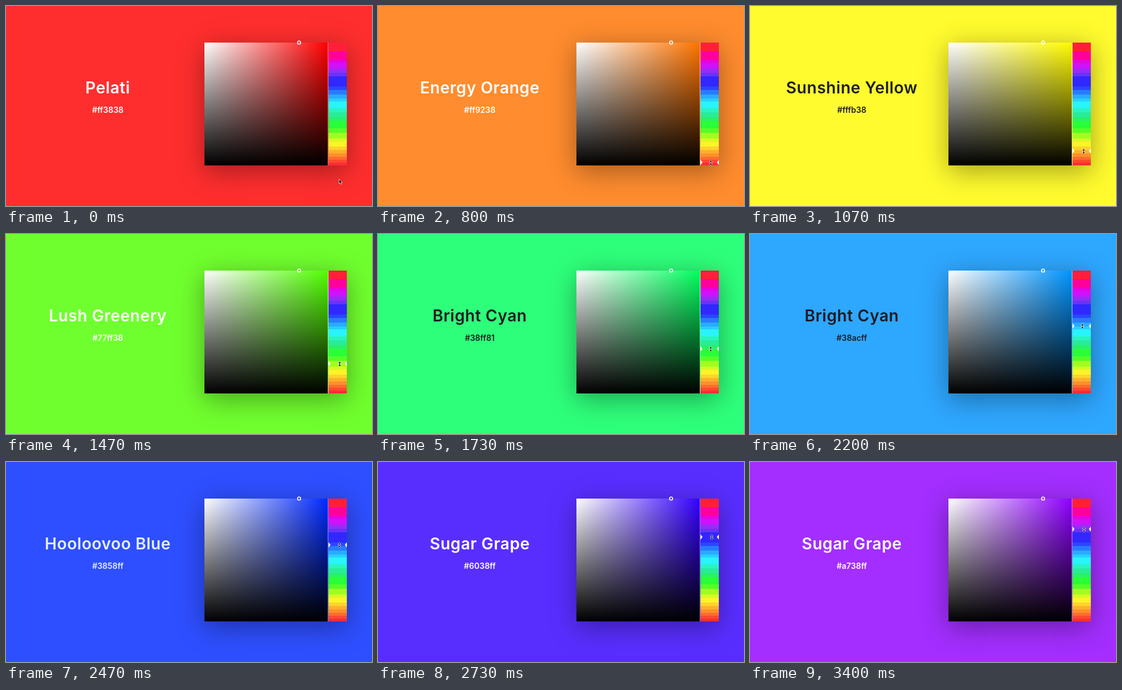
Recreate the animation shown at these times as an HTML page. Size 640 by 350 pixels, loop 3470 ms.

```html
<!DOCTYPE html>
<html lang="en">
<head>
<meta charset="utf-8">
<title>Colour names</title>
<style>
html, body { margin: 0; width: 100%; height: 100%; overflow: hidden; }
#stage { position: relative; width: 640px; height: 350px; overflow: hidden; background: hsl(var(--hue) 100% 59%); }
#stage > * { position: absolute; }
#name, #hex { left: 0; width: 356px; text-align: center; font-family: "Work Sans", Inter, sans-serif; font-weight: 600; white-space: nowrap; }
#name { top: 125px; font-size: 28px; line-height: 36px; letter-spacing: .02em; }
#hex { top: 172px; font-size: 14px; line-height: 20px; }
#picker { left: 347px; top: 64px; width: 249px; height: 215px; box-shadow: 0 10px 44px rgba(0, 0, 0, .36); }
#square { left: 347px; top: 64px; width: 215.5px; height: 215px;
  background: linear-gradient(transparent, #000), linear-gradient(90deg, #fff, hsl(var(--hue) 100% 50%)); }
#overlay { inset: 0; }
</style>
</head>
<body>
<div id="stage">
  <div id="name"></div>
  <div id="hex"></div>
  <div id="picker"></div>
  <div id="square"></div>
  <svg id="overlay" width="640" height="350">
    <path d="M563 64V279" stroke="#fff" stroke-opacity=".45"/>
    <g id="strip"></g>
    <circle cx="512.5" cy="64" r="2.7" fill="none" stroke="#fff" stroke-width="1.6"/>
    <path id="marks" d="M564-4.5 567.500 0 564 4.500ZM596-4.500 592.500 0 596 4.500Z" fill="#fff"/>
    <path id="arrow" d="M0 0V8L1.800 6.400 3 9 4.400 8.400 3.200 5.800H5.600Z" stroke="#fff" stroke-width=".7"/>
    <path id="resize" d="M0-4.500 2.700-1.500H.8V1.500H2.700L0 4.500-2.700 1.500H-.8V-1.500H-2.700Z" stroke="#fff" stroke-width=".7"/>
  </svg>
</div>
<script>
const LOOP = 3470, FPS = 15;
const DARK = '#1c1c22';
const $ = id => document.getElementById(id);

// hue, name, text colour
const NAMES = [
  [0, 'Pelati', '#fff'],
  [27, 'Energy Orange', '#fff'],
  [59, 'Sunshine Yellow', DARK],
  [101, 'Lush Greenery', '#fff'],
  [182, 'Bright Cyan', DARK],
  [230, 'Hooloovoo Blue', '#e6f0ff'],
  [273, 'Sugar Grape', '#fff']
];
// [tick, value]
const HUE = [[9, 15], [12, 27.1], [16, 58.8], [22, 101], [30, 182.4], [37, 230.4], [42, 257], [46, 273.5]];
const POINTER_X = [[0, 582.5], [12, 582], [16, 583.5], [22, 583.5], [30, 580.5], [37, 583], [46, 584]];
const POINTER_Y = [[0, 303], [4, 315], [8, 283], [9, 281]];
// top edge and colour of each band
const BANDS = [
  [64, '#ff2038'], [79, '#ff009c'], [94, '#e800dc'], [99, '#d210fb'], [108, '#ae22f8'], [112, '#9030f4'],
  [117, '#6b32f6'], [123, '#3028ff'], [141, '#2848ff'], [147, '#287cff'], [155, '#28acff'], [162, '#28d0ff'],
  [167, '#28f4fc'], [179, '#28f4c0'], [186, '#28ec98'], [194, '#28f06c'], [201, '#28ff38'], [214, '#54ff28'],
  [222, '#a0ff20'], [232, '#dcf824'], [238, '#fcf428'], [246, '#ffd42c'], [252, '#ffb02c'], [258, '#ff902c'],
  [264, '#ff6c2c'], [269, '#ff4a30'], [274, '#ff2c38']
];

$('strip').innerHTML = BANDS.map(([y, fill], i) =>
  `<rect x="564" y="${y}" width="32" height="${(BANDS[i + 1]?.[0] ?? 279) - y}" fill="${fill}"/>`).join('');

// Piecewise cubic through the keys, held at both ends
function track(keys, t) {
  const last = keys.length - 1;
  if (t <= keys[0][0]) return keys[0][1];
  if (t >= keys[last][0]) return keys[last][1];
  const i = keys.findIndex(k => k[0] > t) - 1;
  const slope = j => {
    const [a, b] = [keys[Math.max(j - 1, 0)], keys[Math.min(j + 1, last)]];
    return (b[1] - a[1]) / (b[0] - a[0]);
  };
  const [[t0, v0], [t1, v1]] = [keys[i], keys[i + 1]];
  const d = t1 - t0, u = (t - t0) / d, w = 1 - u;
  return w * w * ((1 + 2 * u) * v0 + u * d * slope(i)) + u * u * ((3 - 2 * u) * v1 - w * d * slope(i + 1));
}

function toHex(hue) {
  const channel = n => {
    const k = (n + hue / 60) % 6;
    const v = 255 - 199 * Math.max(0, Math.min(k, 4 - k, 1));
    return Math.round(v).toString(16).padStart(2, '0');
  };
  return '#' + channel(5) + channel(3) + channel(1);
}

function draw(now) {
  const tick = Math.floor(now % LOOP * FPS / 1000 + .05);
  const dragging = tick >= 9;
  const hue = dragging ? track(HUE, tick) : 0;
  const sliderY = 291 - .634 * hue;
  const x = track(POINTER_X, tick);
  const y = dragging ? sliderY + .5 : track(POINTER_Y, tick);
  const [, name, color] = NAMES.reduce((a, b) => Math.abs(b[0] - hue) < Math.abs(a[0] - hue) ? b : a);

  $('stage').style.setProperty('--hue', hue);
  $('stage').style.color = color;
  $('name').textContent = name;
  $('hex').textContent = toHex(hue);
  $('marks').setAttribute('transform', `translate(0 ${sliderY})`);
  $('arrow').setAttribute('transform', `translate(${x} ${y})`);
  $('resize').setAttribute('transform', `translate(${x} ${y})`);
  $('marks').style.display = $('resize').style.display = dragging ? '' : 'none';
  $('arrow').style.display = dragging ? 'none' : '';
}

const start = performance.now();
(function frame() {
  draw(performance.now() - start);
  requestAnimationFrame(frame);
})();
</script>
</body>
</html>
```
